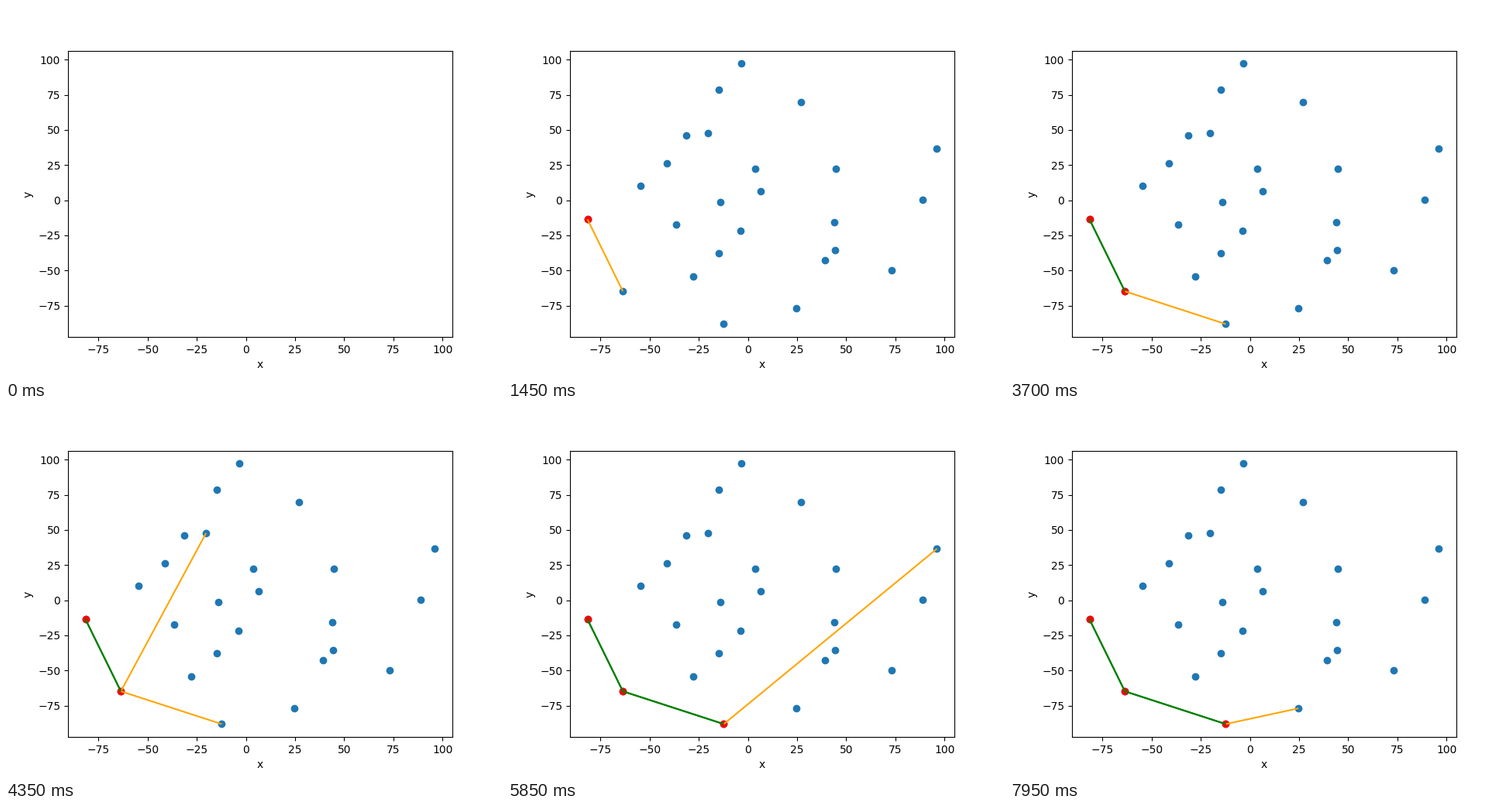
A matplotlib script that plays this animation: 640x480 px, repeating every 8000 ms.

```python
import matplotlib.pyplot as plt
import numpy as np
from matplotlib.animation import FuncAnimation
from matplotlib.collections import LineCollection

FRAMES = 160
STEP_MS = 50

# Input of the algorithm, in the order in which candidates are tried.
POINTS = [
    (96.1, 36.6), (-41.1, 26.2), (-3.3, 97.15), (3.8, 22.3), (44.4, -35.5),
    (-54.5, 10.2), (-31.2, 46), (-12.3, -88.1), (39.2, -42.7), (-63.6, -64.8),
    (27, 69.7), (44.8, 22.3), (6.5, 6.3), (-14.7, -37.8), (-81.6, -13.6),
    (-20.3, 47.7), (88.9, 0.3), (-13.9, -1.4), (-14.7, 78.5), (24.7, -76.9),
    (43.9, -15.7), (-27.7, -54.3), (-36.4, -17.4), (73.1, -49.9), (-3.7, -21.8),
]


def cross(o, a, b):
    return (a[0] - o[0]) * (b[1] - o[1]) - (a[1] - o[1]) * (b[0] - o[0])


def gift_wrap(points):
    """Yield (cloud, hull, edges, trial lines) for every step of the march."""
    yield [], [], [], []
    yield points, [], [], []
    start = min(points)
    hull, edges = [start], []
    while True:
        tip, best = hull[-1], points[0]
        yield points, hull[:], edges[:], []
        yield points, hull[:], edges[:], [(tip, best)]
        for p in points:
            yield points, hull[:], edges[:], [(tip, best), (tip, p)]
            if best == tip or cross(tip, best, p) < 0:
                best = p
            yield points, hull[:], edges[:], [(tip, best)]
        edges.append((tip, best))
        yield points, hull[:], edges[:], []
        if best == start:
            return
        hull.append(best)


def offsets(points):
    return np.array(points, dtype=float).reshape(-1, 2)


def add_lines(color):
    return ax.add_collection(LineCollection([], colors=color), autolim=False)


steps = [step for _, step in zip(range(FRAMES), gift_wrap(POINTS))]

fig, ax = plt.subplots(figsize=(6.4, 4.8), dpi=100)
ax.set_xlabel("x")
ax.set_ylabel("y")

# The full cloud sets the limits once, then they stay fixed.
cloud_dots = ax.scatter(*zip(*POINTS), color="tab:blue")
ax.autoscale_view()
ax.autoscale(False)

hull_dots = ax.scatter([], [], color="red")
trial_lines = add_lines("orange")
hull_lines = add_lines("green")
artists = [cloud_dots, hull_dots, trial_lines, hull_lines]


def draw(i):
    cloud, hull, edges, trials = steps[i]
    cloud_dots.set_offsets(offsets(cloud))
    hull_dots.set_offsets(offsets(hull))
    trial_lines.set_segments(trials)
    hull_lines.set_segments(edges * 2)  # drawn twice for firmer edges
    return artists


anim = FuncAnimation(fig, draw, frames=FRAMES, interval=STEP_MS,
                     init_func=lambda: draw(0), repeat=True, repeat_delay=0)
plt.show()
```
